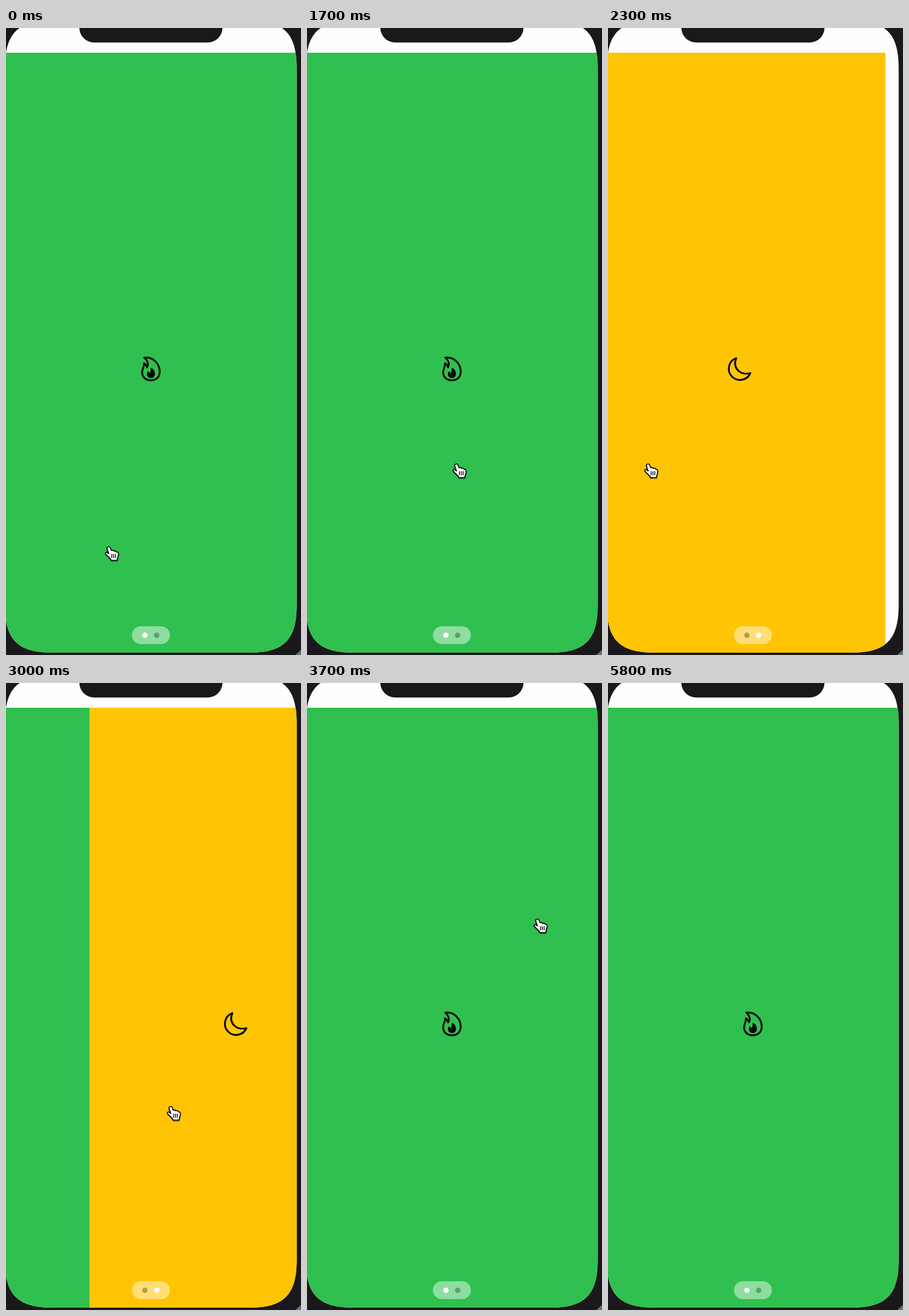
Recreate the animation shown at these times as an HTML page. Size 513 by 1091 pixels, loop 5.9 s.

```html
<!DOCTYPE html>
<html lang="en">
<head>
<meta charset="utf-8">
<title>Swipe between pages</title>
<style>
  html, body { margin: 0; width: 100%; height: 100%; overflow: hidden; background: #1a181b; }
  svg { display: block; width: 100%; height: 100%; }
  .icon { fill: none; stroke: #080a08; stroke-width: 3.2; stroke-linejoin: round; }
  .hand { fill: #fff; stroke: #000; stroke-width: 1.7; stroke-linejoin: round; stroke-linecap: round; }
</style>
</head>
<body>
<svg viewBox="0 0 513 1091">
  <defs>
    <clipPath id="screen">
      <path d="M82-13H421.5C483.5-13 505.5 9 505.5 71V1003C505.5 1065 483.5 1087 421.5 1087H82C20 1087-2 1065-2 1003V71C-2 9 20-13 82-13Z"/>
    </clipPath>
    <path id="hand" d="M-6.8-12C-5-13.2-3-12-2.3-10L-.8-5.8C1-7 3.2-6.4 3.8-4.6C5.6-5.8 7.6-5 8.1-3C10-3.6 11.4-2.4 11.6-.4C12 4 9.3 7 9.3 11.4H-1C-2.4 7.6-5.5 5.4-8 3L-10.9-.4C-11.8-2.4-9.5-3.8-7.2-1.8L-5.2-.2L-8.2-8.8C-8.7-10.3-8.2-11.4-6.8-12Z"/>
  </defs>

  <rect width="513" height="1091" fill="#1a181b"/>
  <path d="M513 1082V1091H503Z" fill="#5c7082"/>

  <g clip-path="url(#screen)">
    <rect x="-2" y="-13" width="508" height="1100" fill="#fffdff"/>
    <g id="pages">
      <g>
        <rect x="-2" y="43" width="507.5" height="1044" fill="#30c04f"/>
        <path class="icon" d="M240.5 573.5C257 572 267.3 585 267.3 598C267.3 607.5 261 613 252 613C243 613 236.7 607.5 236.7 599C236.7 593 241 589.5 239.8 583.5C242.5 584.5 244.2 587 245.3 590.5C248.5 584.5 245.5 578 240.5 573.5Z"/>
        <path d="M252 591C257 593 259 598 259 602C259 606.5 256 609 252 609C248 609 245 606.5 245 602.5C245 600 246 598 247.5 597C248 599 249 600 250.3 600C252 597.5 250.8 594 252 591Z" fill="#080a08"/>
      </g>
      <g transform="translate(507.5)">
        <rect x="-2" y="43" width="507.5" height="1044" fill="#ffc403"/>
        <path class="icon" d="M246 574.5A19.5 19.5 0 1 0 270.5 600.5C253 605 239 592 246 574.5Z"/>
      </g>
    </g>
    <rect x="219" y="1041" width="66" height="31" rx="15.5" fill="#fff" fill-opacity=".45"/>
    <circle class="dot" cx="241.5" cy="1056.7" r="4.7"/>
    <circle class="dot" cx="262" cy="1056.7" r="4.7"/>
  </g>
  <rect x="127.5" y="-40" width="249" height="65.3" rx="26" fill="#1a181b"/>

  <g id="cursor">
    <use href="#hand" y="1.5" fill="#000" stroke="#000" stroke-width="2" opacity=".3"/>
    <use href="#hand" class="hand"/>
    <path class="hand" d="M0 .8V6.8M3.2 .8V6.8M6.4 .8V6.8" style="stroke-width:1.4"/>
  </g>
</svg>
<script>
const LOOP = 5900, STEP = 100, PAGE = 507.5;

const home = { x: 184, y: 915 };
const moves = [
  { from: 0, to: 300, x: 333, y: 785 },
  { from: 400, to: 600, x: 321, y: 771 },
  { from: 800, to: 1200, x: 59, y: 771 },
  { from: 1410, to: 2000, x: 337, y: 771 },
  { from: 2000, to: 2300, x: 75, y: 771 },
  { from: 2800, to: 3200, x: 364, y: 742 },
  { from: 3200, to: 3500, x: 251, y: 430 },
  { from: 3600, to: 3700, x: 406, y: 423 },
  { from: 3700, to: 3900, x: 452, y: 420 },
  { from: 4700, to: 5100, x: 300, y: 1115 }
];

const progress = (t, from, to) => Math.min(1, Math.max(0, (t - from) / (to - from)));
const easeOut = (p, power = 2) => 1 - (1 - p) ** power;

function cursorAt(t) {
  return moves.reduce((at, move) => {
    const p = easeOut(progress(t, move.from, move.to));
    return { x: at.x + (move.x - at.x) * p, y: at.y + (move.y - at.y) * p };
  }, home);
}

// Pull past the last page, then spring back.
function bounce(age) {
  const u = age / 100;
  return u > 0 && u < 6 ? 154 * u * Math.exp(-u) : 0;
}

function scrollAt(t) {
  const page = t < 1800 ? 0 : 1 - easeOut(progress(t, 2900, 3400), 1.54);
  return PAGE * page + bounce(t - 2000) - bounce(t - 3700);
}

const pages = document.getElementById("pages");
const cursor = document.getElementById("cursor");
const dots = document.querySelectorAll(".dot");
const start = performance.now();

function draw(now) {
  const elapsed = Math.max(0, now - start) % LOOP;
  const t = Math.floor(elapsed / STEP) * STEP;
  const scroll = scrollAt(t);
  const { x, y } = cursorAt(t);
  const active = scroll > PAGE / 2 ? 1 : 0;

  pages.setAttribute("transform", `translate(${-scroll})`);
  cursor.setAttribute("transform", `translate(${x} ${y})`);
  dots.forEach((dot, i) => {
    dot.setAttribute("fill", i === active ? "#fff" : "#000");
    dot.setAttribute("fill-opacity", i === active ? 1 : 0.3);
  });
  requestAnimationFrame(draw);
}
draw(start);
</script>
</body>
</html>
```
